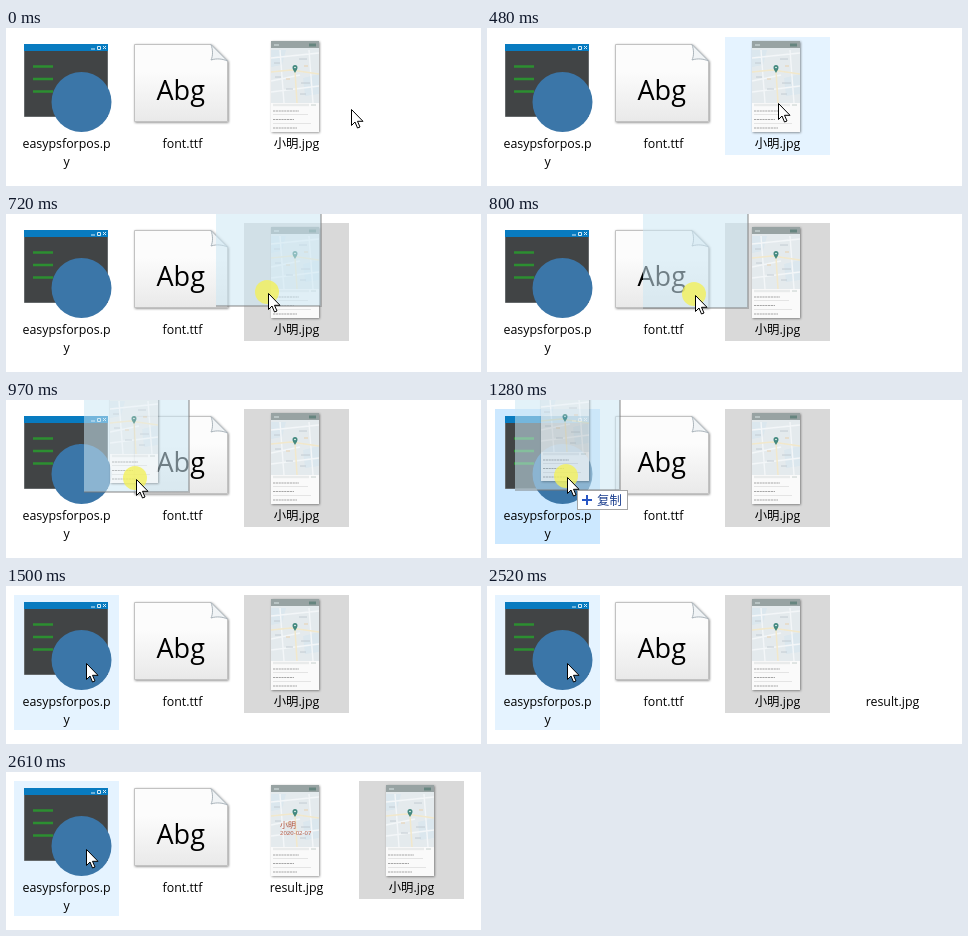
Write an HTML page that moves like this. It is 475 px wide and 158 px high and loops after 3.32 s.

```html
<!DOCTYPE html>
<html lang="zh-CN">
<head>
<meta charset="utf-8">
<title>Drag and drop</title>
<style>
html, body { margin: 0; width: 100%; height: 100%; overflow: hidden; background: #fff; }
svg { display: block; width: 100%; height: 100%; }
text { font-family: "Open Sans", "Noto Sans CJK SC", "Noto Sans CJK", sans-serif; font-size: 12.4px; }
.label { text-anchor: middle; }
</style>
</head>
<body>
<svg viewBox="0 0 475 158">
  <defs>
    <linearGradient id="paper" x2="0" y2="1">
      <stop offset=".35" stop-color="#fcfcfc"/><stop offset="1" stop-color="#e9e9e9"/>
    </linearGradient>
    <filter id="shadow" x="-20%" y="-20%" width="150%" height="150%">
      <feDropShadow dx=".8" dy=".8" stdDeviation=".8" flood-color="#000" flood-opacity=".45"/>
    </filter>
    <clipPath id="mapArea"><path d="M0 8H48V62H0Z"/></clipPath>

    <!-- phone screenshot with a map and a list of places -->
    <g id="photo">
      <path d="M0 0H48V91H0Z" fill="#fafafa" filter="url(#shadow)"/>
      <path d="M0 0H48V62H0Z" fill="#e4eaed"/>
      <path d="M0 0H48V7H0Z" fill="#98a3a3"/>
      <path d="M3 4H8" stroke="#b9c4c4" stroke-width="2"/>
      <path d="M38 4H45" stroke="#66857f" stroke-width="3"/>
      <g clip-path="url(#mapArea)" fill="none">
        <path d="M0 9H15L11 24L0 26ZM32 37L48 33V53L34 55Z" fill="#dbe7ee"/>
        <path d="M0 17L48 12M9 9L13 62M0 51L48 45M38 9L42 62M0 40L29 34" stroke="#f3f6f8" stroke-width="1.4"/>
        <path d="M0 31L20 29L48 33M24 30L26 62" stroke="#f2e8cb" stroke-width="1.5"/>
        <path d="M3 22H9M28 18H36M4 36H10M30 42H39M15 48H22M29 53H35" stroke="#c2cbd2"/>
        <path d="M15 38H19M33 25H37" stroke="#e8cfae" stroke-width="1.2"/>
      </g>
      <path d="M24 32C22.500 29 21.500 28.500 21.500 26.500A2.500 2.500 0 0 1 26.500 26.500C26.500 28.500 25.500 29 24 32Z" fill="#43897f"/>
      <circle cx="24" cy="26.500" r=".8" fill="#fff"/>
      <path d="M2 64H38" stroke="#e9ebeb" stroke-width="2.500"/>
      <path d="M40 64H45" stroke="#c5cfcc"/>
      <path d="M2 70H28M2 78.500H23M2 87H26" stroke="#a6a6a6" stroke-width="1.200" stroke-dasharray="2.200 .6"/>
      <path d="M2 73.500H37M2 82.500H40" stroke="#e4e4e4"/>
    </g>
  </defs>

  <rect width="475" height="158" fill="#fff"/>
  <rect id="scriptBack" x="8" y="9" width="105" height="135"/>
  <rect id="photoBack" y="9" width="105" height="118"/>

  <g id="script">
    <path d="M18.500 16.500H101.500V88.500H18.500Z" fill="#414445" stroke="#65696b"/>
    <path d="M18 16H102V23H18Z" fill="#087bc0"/>
    <path d="M85 21H89M97 18L100 21M100 18L97 21M91.500 18.500H94.500V21.500H91.500Z" fill="none" stroke="#d5ebf7"/>
    <path d="M27 38.500H47M27 51H47M27 63.500H47" stroke="#2c8f31" stroke-width="2.500"/>
    <circle cx="75.500" cy="74" r="30" fill="#3b76a8"/>
    <text class="label" x="60.500" y="120">easypsforpos.p</text>
    <text class="label" x="60.500" y="138">y</text>
  </g>

  <g id="font">
    <path d="M128.500 16.500H205L221.500 33V93.500H128.500Z" fill="url(#paper)" stroke="#c2c2c2" filter="url(#shadow)"/>
    <path d="M205 16.500C207 22 207 28 205 32C211 30 217 31 221.500 33Z" fill="#f1f4f6" stroke="#a9b3ba"/>
    <text x="150.500" y="71.500" style="font-size:27px">Abg</text>
    <text class="label" x="176.500" y="120">font.ttf</text>
  </g>

  <g id="photoItem">
    <use href="#photo" x="27" y="13"/>
    <text class="label" x="52.500" y="120">小明.jpg</text>
  </g>

  <g id="resultItem">
    <g id="resultPicture">
      <use href="#photo" x="27" y="13"/>
      <g fill="#b5533c">
        <text x="36" y="56" style="font-size:8px">小明</text>
        <text x="36" y="63" style="font-size:6px">2020-02-07</text>
      </g>
    </g>
    <text class="label" x="52.500" y="120">result.jpg</text>
  </g>

  <!-- everything below is placed relative to the pointer tip -->
  <g id="pointer">
    <g id="ghost">
      <rect x="-52" y="-105" width="105" height="118" fill="#cde8f5" fill-opacity=".55"/>
      <path d="M53 -105V13H-52" fill="none" stroke="#777" stroke-opacity=".45" stroke-width="2"/>
      <use id="ghostPhoto" href="#photo" x="-26" y="-87" opacity=".7"/>
    </g>
    <circle id="press" cx="-1" cy="-1" r="12" fill="#f3f05a" fill-opacity=".8"/>
    <g id="copyTip">
      <rect x="10.500" y="13.500" width="50" height="19" fill="#fff" stroke="#a5a5a5"/>
      <path d="M15 23H25M20 18V28" stroke="#2856c4" stroke-width="2"/>
      <text x="30" y="28" fill="#1c3f8f">复制</text>
    </g>
    <path d="M.5 .5V16.500L4 13L6.500 19L9 18L6.500 12.300H12Z" fill="#fff" stroke="#000"/>
  </g>
</svg>
<script>
const LOOP = 3320;
const PRESS = 560, DRAG = 720, DROP = 1500, CREATED = 2520, SORTED = 2610;
const COLUMN = { third: 238, fourth: 353 };
const COLOR = { hover: "#e5f3ff", selected: "#cce8ff", inactive: "#d9d9d9", none: "none" };

// start time, pointer x, pointer y; each position is held until the next
const path = [
  [0, 345, 81], [80, 331, 81], [170, 312, 79], [260, 304, 77],
  [410, 298, 76], [480, 291, 75], [720, 262, 79], [800, 208, 81],
  [870, 165, 80], [950, 130, 79], [1040, 104, 78], [1120, 88, 77],
  [1200, 82, 77], [1280, 80, 77]
];

const get = id => document.getElementById(id);
const show = (id, visible) => get(id).setAttribute("display", visible ? "inline" : "none");
const move = (id, x, y = 0) => get(id).setAttribute("transform", `translate(${x} ${y})`);
const fill = (id, color) => get(id).setAttribute("fill", color);

function photoColor(t, x) {
  if (t >= DRAG) return COLOR.inactive;
  if (t >= PRESS) return COLOR.selected;
  return x < 343 ? COLOR.hover : COLOR.none;
}

function draw(t) {
  const [, x, y] = path.findLast(step => step[0] <= t);
  const dragging = t >= DRAG && t < DROP;
  const overScript = x < 113;
  const photoX = t < SORTED ? COLUMN.third : COLUMN.fourth;

  move("pointer", x, y);
  show("press", t >= PRESS && t < DROP);
  show("ghost", dragging);
  show("ghostPhoto", x < 150);
  show("copyTip", dragging && overScript);

  fill("scriptBack", !overScript ? COLOR.none : dragging ? COLOR.selected : COLOR.hover);
  fill("photoBack", photoColor(t, x));
  move("photoBack", photoX);
  move("photoItem", photoX);

  show("resultItem", t >= CREATED);
  show("resultPicture", t >= SORTED);
  move("resultItem", t < SORTED ? COLUMN.fourth : COLUMN.third);
}

const start = performance.now();
function tick() {
  draw((performance.now() - start) % LOOP);
  requestAnimationFrame(tick);
}
tick();
</script>
</body>
</html>
```
